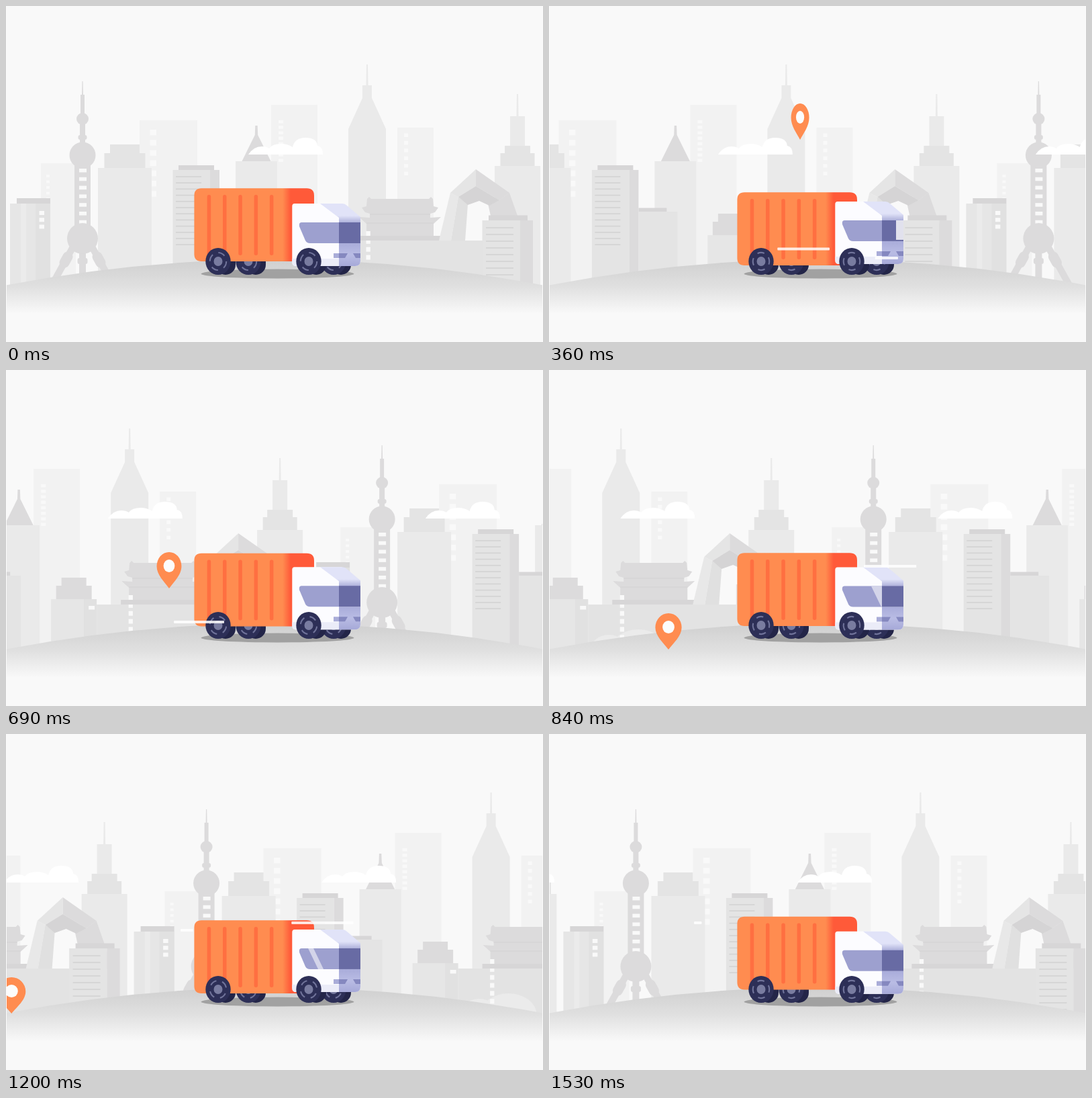
These frames come from a looping animation (800 px wide and 500 px high, 1560 ms). An HTML page:

```html
<!DOCTYPE html>
<html lang="en">
<head>
<meta charset="utf-8">
<title>Delivery truck</title>
<style>
html, body { margin: 0; width: 100%; height: 100%; overflow: hidden; background: #f9f9f9; }
svg { display: block; width: 800px; height: 500px; }
</style>
</head>
<body>
<svg id="stage" viewBox="0 0 800 500" xmlns="http://www.w3.org/2000/svg"></svg>
<script>
const LOOP = 1560, STEP = 30, CLOUD_GAP = 473;
const LIT = '#f9f9f9', PALE = '#f2f2f2', SOFT = '#eaeaea', MID = '#e4e4e4', DEEP = '#dcdbdc', CAP = '#d7d6d7';
const NAVY = '#2d2f57', TREAD = '#232548', GLASS = '#9da0cf';

const box = (x, y, w, h, fill, rx = 0) =>
  `<rect x="${x}" y="${y}" width="${w}" height="${h}" rx="${rx}" fill="${fill}"/>`;
const tall = (x, w, y, fill) => box(x, y, w, 430 - y, fill);
const disc = (x, y, rx, ry, fill) => `<ellipse cx="${x}" cy="${y}" rx="${rx}" ry="${ry}" fill="${fill}"/>`;
const poly = (pts, fill) => `<polygon points="${pts}" fill="${fill}"/>`;
const path = (d, fill) => `<path d="${d}" fill="${fill}"/>`;
const repeat = (n, f) => Array.from({ length: n }, (_, i) => f(i)).join('');

const windows = (x, w, y, h, gap, n) => repeat(n, i => box(x, y + i * gap, w, h, LIT));
const slats = (x, w, y, gap, n) => repeat(n, i => box(x, y + i * gap - .8, w, 1.6, '#d3d3d3'));

// Half outline as "dx,y" pairs, mirrored around cx
function mirror(cx, half, fill) {
  const pts = half.split(' ').map(p => p.split(',').map(Number));
  const left = pts.map(([x, y]) => [cx - x, y]).reverse();
  return poly([...left, ...pts.map(([x, y]) => [cx + x, y])].join(' '), fill);
}

// Centred storeys, each running down behind the next one
const stack = (cx, fill, ...tiers) => tiers.map(([w, y]) => tall(cx - w / 2, w, y, fill)).join('');

function backRow() {
  return tall(52, 52, 234, PALE) + windows(60, 5, 251, 4, 8.5, 6)
    + tall(199, 86, 170, PALE) + windows(214.5, 9.5, 184, 8.5, 15.2, 7)
    + tall(395, 69, 147, PALE) + windows(406, 7, 170, 4.5, 8.2, 8)
    + tall(583, 54, 181, PALE) + windows(593, 6, 189.5, 5.5, 11.4, 6);
}

function middleRow() {
  return stack(177, MID, [44, 206], [61, 219]) + stack(177, SOFT, [80, 241])
    + tall(342, 62, 231, SOFT) + mirror(373, '1.7,178 2.2,192 21.5,231', DEEP)
    + mirror(538, '1,87 1.5,118 7,118 7,137 28,183 28,430', SOFT)
    + mirror(762, '1,131 1.5,164 11,164 11,210', SOFT)
    + stack(762, MID, [38, 208], [51, 219]) + stack(762, SOFT, [68, 238]);
}

function tvTower() {
  const cx = 114, c = DEEP;
  const leg = s => `<g stroke="${c}"><path d="M${cx + s * 15} 360L${cx + s * 46} 416" stroke-width="10"/>`
    + `<path d="M${cx + s * 22} 373L${cx + s * 27} 382" stroke-width="15" stroke-linecap="round"/></g>`;
  return mirror(cx, '.6,112 1,132 3,132 3,165 4,176 4,210', c)
    + disc(cx, 168, 9, 9, c) + box(cx - 6.5, 192, 13, 7, c, 3) + disc(cx, 222, 19.5, 19.5, c)
    + box(cx - 12, 236, 24, 100, c) + windows(cx - 5, 11, 242, 5.5, 12.8, 7)
    + leg(1) + leg(-1) + box(cx - 5, 366, 10, 50, c) + box(cx - 7.5, 375, 15, 9, c, 3)
    + disc(cx, 346, 23, 23, c);
}

function temple() {
  const cx = 587;
  return mirror(cx, '43,287 46,284 49,287 50,298 57,300 52,307 45,309 45,315 61,314 50,324 50,343', DEEP)
    + box(cx - 45, 309, 90, 2, CAP) + box(cx - 50, 322, 100, 2, CAP)
    + windows(cx - 50.5, 6.3, 335, 7, 11.85, 9)
    + box(cx - 62, 342, 124, 7, CAP);
}

function archTower() {
  return poly('718,294 735,289 750,278 775,349 730,349', DEEP)
    + poly('662,278 674,284 663,349 645,349', '#e8e8e8')
    + poly('674,284 688,295 684,349 663,349', '#e0e0e0')
    + poly('662,278 700,243 700,268 674,284', '#e5e5e5')
    + poly('700,243 750,278 735,289 700,268', DEEP)
    + poly('674,284 700,268 735,289 720,297 705,290 688,296', '#d5d4d5');
}

function frontRow() {
  return tall(6, 60, 294, '#e6e6e6') + tall(22, 8, 294, '#ebebeb') + tall(44, 22, 294, '#e1e1e1')
    + box(16, 286, 50, 8, CAP) + windows(49.5, 7.5, 305, 6, 10.2, 3)
    + tvTower()
    + tall(318, 58, 306, MID) + box(318, 300.5, 42, 5.5, CAP)
    + tall(248.5, 55.5, 244, MID) + tall(304, 14, 244, DEEP) + box(257, 237, 53, 7, CAP)
    + slats(253, 38, 254, 9.2, 12)
    + tall(489, 223, 349, '#e3e3e3') + disc(520, 418, 28, 24, '#ebebeb') + disc(564, 418, 42, 32, '#ebebeb')
    + stack(455, DEEP, [37, 309], [53, 321]) + tall(421, 49, 341, '#e6e6e6') + tall(470, 19, 341, '#e1e1e1')
    + box(477, 351, 9, 5.5, LIT)
    + temple() + archTower()
    + tall(709.5, 56.5, 319, MID) + tall(766, 19, 319, DEEP) + box(719, 311.5, 58, 7.5, CAP)
    + slats(715, 41, 330, 10, 9);
}

const cloud = i => `<g transform="translate(${361 + (i - 1) * CLOUD_GAP} 196)">`
  + path('M0 25Q8 13 20 13Q27 13 31 16Q36 9 49 9Q58 9 66 14Q69 0 85 0Q102 0 103 12Q111 13 111 25Z', '#fff') + '</g>';

const tread = x => box(x - 4, 360, 30, 40, TREAD, 15);
const wheel = x => `<g transform="translate(${x} 380)">` + disc(0, 0, 18.7, 20, NAVY)
  + '<circle class="rim" r="13" fill="none" stroke="#70739a" stroke-width="2.2" stroke-dasharray="11 9.42"/>'
  + disc(0, 0, 6.5, 7, '#797ca0') + '</g>';

const cargo = path('M291.4 271.3H448Q459 271.3 459 282V380H291.4Q280.4 380 280.4 369V282Q280.4 271.3 291.4 271.3Z', 'url(#orange)')
  + repeat(5, i => box(299.7 + i * 23.3, 281, 5.5, 90, '#ff6f41', 2.7));

const PANE = 'M440 322H496V353H453Q448 353 446 349L437 328Q436 322 440 322Z';
const cab = path('M430 294H500L528 315V379Q528 387 520 387H432Q426.3 387 426.3 381V298Q426.3 294 430 294Z', '#fcfcff')
  + path('M468 294H501Q505 294 508 297L528 314V324H496V315Z', 'url(#roof)')
  + path('M496 353H528V379Q528 387 520 387H496Z', 'url(#nose)')
  + path('M426.3 376H496V387H432Q426.3 387 426.3 381Z', '#ebecf8')
  + box(496, 322, 32, 31, '#686ba4') + path(PANE, GLASS)
  + '<g clip-path="url(#side)"><polygon id="sideGlint" fill="#fff" opacity=".55"/></g>'
  + '<g clip-path="url(#front)"><rect id="frontGlint" y="322" width="12" height="29" fill="#fff" opacity=".8"/></g>'
  + box(488, 368, 8, 7, '#a9acd8') + poly('496,368 509,368 505,375 496,375', '#8588bf')
  + poly('517,368 528,368 528,375 521,375', '#8588bf');

const fade = (id, attrs, ...colors) => `<linearGradient id="${id}" gradientUnits="userSpaceOnUse" ${attrs}>`
  + colors.map((c, i) => `<stop offset="${i / (colors.length - 1)}" stop-color="${c}"/>`).join('') + '</linearGradient>';

const stage = document.getElementById('stage');
stage.innerHTML = '<defs>'
  + fade('ground', 'x1="0" x2="0" y1="377" y2="458"', '#cfcfcf', '#e0e0e0', '#f9f9f9')
  + fade('orange', 'x1="412" x2="424" y1="0" y2="0"', '#ff8c50', '#ff5a39')
  + fade('roof', 'x1="0" x2="0" y1="312" y2="323"', '#e1e3f8', '#a9acd8')
  + fade('nose', 'x1="0" x2="0" y1="353" y2="387"', '#a9acda', '#b9bce4', '#a6a9d8')
  + `<clipPath id="side"><path d="${PANE}"/></clipPath>`
  + '<clipPath id="front"><rect x="496" y="322" width="32" height="31"/></clipPath></defs>'
  + box(0, 0, 800, 500, LIT)
  + `<g id="city"><g id="block">${backRow() + middleRow() + frontRow()}</g><use href="#block" x="800"/></g>`
  + `<g id="clouds">${repeat(3, cloud)}</g>`
  + path('M0 415.5Q400 339 800 415.5V500H0Z', 'url(#ground)')
  + `<g id="pin">${path('M0 0C-8-10-21-20-21-33A21 21 0 0 1 21-33C21-20 8-10 0 0Z', '#ff8c50') + disc(0, -33.5, 9.5, 9.5, '#fcfcfc')}</g>`
  + disc(404.5, 398.5, 114, 7, '#a1a1a1')
  + [361, 488].map(x => tread(x) + wheel(x)).join('') + tread(316) + tread(451)
  + `<g id="cargo">${cargo}</g><g id="cab">${cab}</g>`
  + wheel(316) + wheel(451)
  + '<g id="streaks" fill="#fff" opacity=".85">' + '<rect height="4" rx="1"/>'.repeat(4) + '</g>'
  + box(0, 0, 1, 500, '#fafafa') + box(799, 0, 1, 500, '#fafafa');

const $ = id => document.getElementById(id);
const rims = stage.querySelectorAll('.rim');
const bars = $('streaks').children;
const set = (el, attrs) => Object.entries(attrs).forEach(([k, v]) => el.setAttribute(k, v));
const move = (id, x, y, more = '') => set($(id), { transform: `translate(${x} ${y})${more}` });
const clamp = (v, lo, hi) => Math.max(lo, Math.min(hi, v));

// Each end of a streak runs the same track, the tail a little later
const TAIL_DELAY = 105;
const STREAKS = [
  { y: 361.5, from: 552, to: 250, start: 74, time: 408 },
  { y: 375, from: 520, to: 220, start: 312, time: 420 },
  { y: 292, from: 560, to: 260, start: 718, time: 402 },
  { y: 281, from: 529, to: 216, start: 1082, time: 356 }
];

function drawPin(t) {
  const s = t - 150;
  const x = 449 - .341 * s - .000075 * s * s;
  const fall = 259 - .5453 * s + .001236 * s * s;
  const tip = t > 400 ? Math.min(416, fall) : fall;
  const sx = Math.min(1, 1.05 * (1 - Math.exp(-t / 380)));
  const sy = Math.min(1, t / 345);
  move('pin', x, tip, ` scale(${sx} ${sy})`);
}

function drawGlints(t) {
  set($('frontGlint'), { x: 517 - (t - 360) * .12 });
  const x = 470 - (t - 960) * .083;
  const w = t < 780 ? 0 : clamp(20 - (t - 960) * .05, 0, 20);
  set($('sideGlint'), { points: `${x},322 ${x + w},322 ${x + w + 15},353 ${x + 15},353` });
}

function drawStreaks(t) {
  STREAKS.forEach(({ y, from, to, start, time }, i) => {
    const at = begin => from + (to - from) * clamp((t - begin) / time, 0, 1);
    const head = at(start);
    set(bars[i], { x: head, y: y - 2, width: at(start + TAIL_DELAY) - head });
  });
}

function draw(t) {
  const k = t / LOOP, bob = 1 - Math.abs(t / 390 % 2 - 1);
  move('city', -800 * k, 0);
  move('clouds', -CLOUD_GAP * k, 0);
  move('cargo', 0, 6.5 * bob);
  move('cab', 0, -3.3 * bob);
  rims.forEach(r => set(r, { transform: `scale(.94 1) rotate(${1440 * k})` }));
  drawPin(t);
  drawGlints(t);
  drawStreaks(t);
}

const start = performance.now();
function tick() {
  const t = (performance.now() - start) % LOOP;
  draw(Math.floor(t / STEP) * STEP);
  requestAnimationFrame(tick);
}
tick();
</script>
</body>
</html>
```
